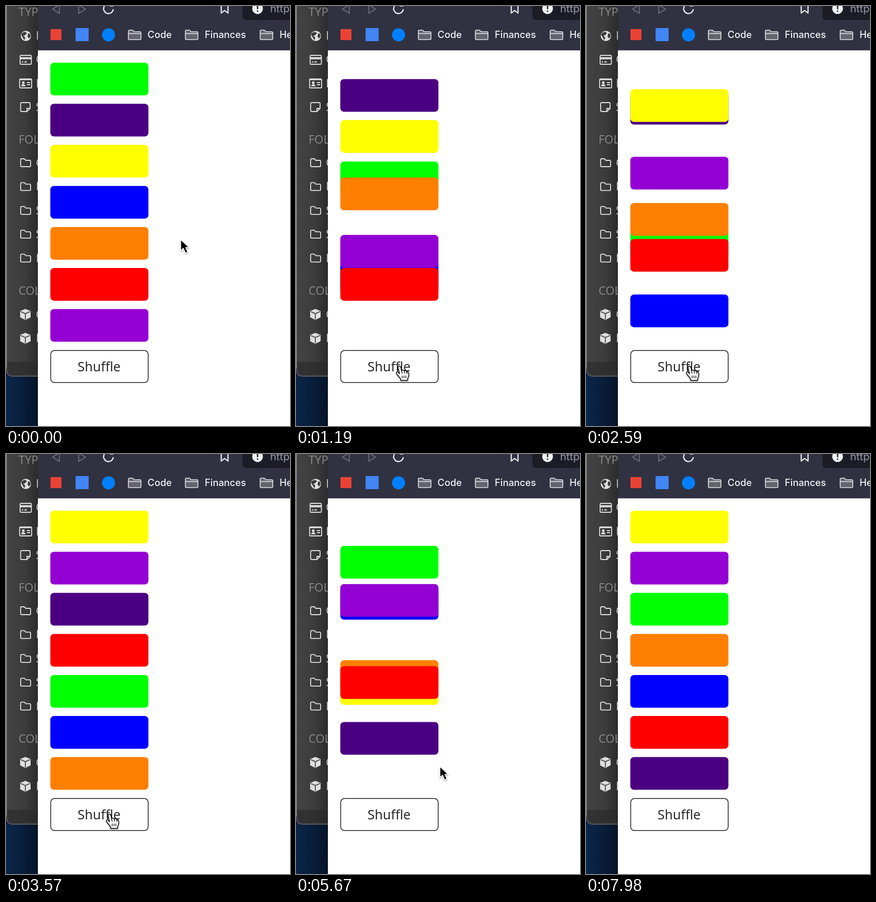
Write an HTML page that moves like this. It is 543 px wide and 800 px high and loops after 8000 ms.

```html
<!DOCTYPE html>
<html lang="en">
<head>
<meta charset="utf-8">
<title>Shuffle</title>
<style>
html, body { margin: 0; width: 100%; height: 100%; overflow: hidden; background: #fff; }
svg { display: block; width: 543px; height: 800px; }
.side { font: 22px "Open Sans", sans-serif; fill: #8a8a8a; }
.item { font: 22px "Open Sans", sans-serif; fill: #c4c4c4; }
.mark { font: 500 18.3px Inter, sans-serif; fill: #f2f2f5; }
.button { font: 25px "Noto Sans", sans-serif; fill: #2b2b2b; }
.line { fill: none; stroke: #dedede; stroke-width: 1.8; stroke-linejoin: round; }
</style>
</head>
<body>
<svg viewBox="0 0 543 800">
  <defs>
    <linearGradient id="panel">
      <stop offset="0" stop-color="#444"/>
      <stop offset=".6" stop-color="#3b3b3b"/>
      <stop offset="1" stop-color="#2b2b2b"/>
    </linearGradient>
    <linearGradient id="desk">
      <stop offset="0" stop-color="#0b274b"/>
      <stop offset="1" stop-color="#061429"/>
    </linearGradient>
    <filter id="shadow" x="-50%" y="-50%" width="200%" height="200%">
      <feDropShadow dx="0" dy="1.5" stdDeviation="1.3" flood-opacity=".4"/>
    </filter>
    <path id="folder" class="line" d="M28 293q0-2 2-2h5l3 3h7q2 0 2 2v8q0 2-2 2H30q-2 0-2-2z"/>
    <g id="cube">
      <path d="M37 577l10 4v12l-10 5-10-5v-12z" fill="#dedede"/>
      <path d="M28 582l9 4 9-4M37 586v11" fill="none" stroke="#3b3b3b" stroke-width="1.6"/>
    </g>
    <g id="markFolder" stroke="#e4e4e8" stroke-width="1.6" stroke-linejoin="round">
      <path d="M1 17V3q0-2 2-2h6l3 3h11q2 0 2 2v11q0 2-2 2H3q-2 0-2-2z" fill="#62646f"/>
      <path d="M1 7.5h24" fill="none"/>
    </g>
  </defs>

  <rect y="690" width="62" height="110" fill="url(#desk)"/>
  <path d="M0 0h62v706H14Q1 706 1 692V0z" fill="url(#panel)"/>
  <path d="M2 678h60v27H14Q2 705 2 692z" fill="#282828" opacity=".6"/>
  <path d="M1 0v692q0 13 13 13h48" fill="none" stroke="#696969" stroke-width="1.3"/>

  <text class="side" x="24" y="19">TYPES</text>
  <text class="side" x="24" y="262">FOLDERS</text>
  <text class="side" x="24" y="550">COLLECTIONS</text>
  <g id="items"></g>

  <circle cx="38" cy="57" r="9.8" fill="#dedede"/>
  <path d="M31 51l6-2 3 3-4 4-3 1 4 3-2 5-3-5-3-5zM42 52l4 1 1 5-3 4-3-4 1-3z" fill="#3b3b3b"/>
  <rect class="line" x="27" y="94" width="21.5" height="17" rx="2"/>
  <path d="M27 99.5h21" stroke="#dedede" stroke-width="4"/>
  <path d="M30 106.5h3m2 0h5" stroke="#dedede" stroke-width="1.8"/>
  <rect class="line" x="26" y="139" width="23" height="17" rx="2"/>
  <path d="M26 140h23" stroke="#dedede" stroke-width="2.5"/>
  <circle cx="33" cy="146" r="2.6" fill="#dedede"/>
  <path d="M29 153q0-4 4-4t4 4zM40 145h6v2h-6zm0 4h6v2h-6z" fill="#dedede"/>
  <path class="line" d="M30 184h14q2 0 2 2v9l-6 6H30q-2 0-2-2v-13q0-2 2-2zM46 195h-6v6"/>

  <rect x="61" width="482" height="800" fill="#fff"/>
  <rect x="61" width="482" height="84.5" fill="#303241"/>
  <path d="M102-2v16L89 6zM139-2v16l13-8z" fill="none" stroke="#70727e" stroke-width="1.7" stroke-linejoin="round"/>
  <path d="M202-2a9.3 9.3 0 1 0 3.2 8" fill="none" stroke="#f2f2f5" stroke-width="2.2"/>
  <path d="M198 1h7v-7z" fill="#f2f2f5"/>
  <path d="M411.500-3v16.500l6.500-5 6.500 5V-3" fill="none" stroke="#f2f2f5" stroke-width="2.2" stroke-linejoin="round"/>
  <path d="M452 0h91v26.500h-84q-7 0-7-7z" fill="#1b1c26"/>
  <circle cx="481" cy="5" r="10.300" fill="#f2f2f5"/>
  <path d="M481-2v8m0 2.500v2.500" stroke="#1b1c26" stroke-width="2.500"/>
  <text class="mark" x="505" y="12" style="font-size:20px;font-weight:400;fill:#999ba5">http</text>

  <rect x="85" y="44" width="21" height="21" fill="#ea4335"/>
  <rect x="133" y="42" width="25" height="25" fill="#4285f4"/>
  <circle cx="196" cy="55" r="12.500" fill="#0080ff"/>
  <use href="#markFolder" x="233" y="45"/>
  <use href="#markFolder" x="342" y="45"/>
  <use href="#markFolder" x="485" y="45"/>
  <text class="mark" x="270.500" y="61">Code</text>
  <text class="mark" x="380" y="61">Finances</text>
  <text class="mark" x="523" y="61">Health</text>

  <rect x="85.500" y="656.300" width="186.300" height="61" rx="7" fill="#fff" stroke="#222" stroke-width="1.500"/>
  <text class="button" x="178" y="696" text-anchor="middle">Shuffle</text>
  <g id="cards"></g>

  <g id="cursor" filter="url(#shadow)" stroke-linejoin="round">
    <path id="arrow" d="M0 0v21l5-4.500 4 9 4.500-2-4-8.500h6.500z" fill="#000" stroke="#fff" stroke-width="1.500"/>
    <g id="hand" stroke="#111" stroke-width="1.500">
      <path d="M-3 2q0-3 2.500-3T2.500 1.500L4 8q.5-2 2.500-1.500T9 8.500q1-1.500 3-.5t2 2.500q3-1.500 3.500 2v5l-2 5V26H2v-3l-6.500-8q-2.500-3-1-4.500t4 1.500l1.500 1.500z" fill="#fff"/>
      <path d="M4 8l1 5M9 9l.5 4M14 11v3M5 17v5m3.500-5v5m3.500-5v5" fill="none" stroke-width="1.300"/>
    </g>
  </g>
</svg>
<script>
const LOOP = 8000, SLIDE = 600;
const $ = id => document.getElementById(id);
const colors = { G: "#0f0", I: "#4b0082", Y: "#ff0", B: "#00f", O: "#ff7f00", R: "#f00", V: "#9400d3" };

// Each order takes effect when the button is pressed at the given time.
const orders = [
  [-SLIDE, "GIYBORV"], [850, "IYOVGRB"], [2350, "YVIRGBO"], [5250, "GBVORYI"], [6850, "YVGOBRI"]
];

// Pointer stops: time, x, y.
const stops = [
  [0, 334, 445], [100, 334, 445], [320, 324, 578], [520, 285, 680], [700, 198, 687],
  [3750, 198, 687], [4150, 335, 618], [4500, 335, 618], [4900, 241, 671],
  [5450, 241, 671], [5850, 300, 540], [6350, 300, 540], [6650, 268, 649],
  [6800, 235, 680], [7050, 235, 680], [7200, 300, 682], [7350, 450, 636], [7500, 560, 610]
];

const ease = p => p * p * (3 - 2 * p);
const mix = (a, b, p) => a + (b - a) * p;
const clamp = p => Math.max(0, Math.min(1, p));
const slotY = i => 108 + 78.22 * i;

$("items").innerHTML =
  [..."LCLS"].map((c, i) => `<text class="item" x="57" y="${64 + 45.3 * i}">${c}</text>`).join("") +
  [..."CLSSL"].map((c, i) => `<use href="#folder" y="${45.4 * i}"/><text class="item" x="57" y="${306 + 45.4 * i}">${c}</text>`).join("") +
  [..."CL"].map((c, i) => `<use href="#cube" y="${45.4 * i}"/><text class="item" x="57" y="${595 + 45.4 * i}">${c}</text>`).join("");

$("cards").innerHTML = Object.entries(colors).map(([key, fill]) =>
  `<rect id="card${key}" x="84.700" width="187.600" height="62.300" rx="7" fill="${fill}"/>`).join("");

function drawCards(t) {
  const k = orders.findLastIndex(([start]) => start <= t);
  const [start, now] = orders[k];
  const before = orders[Math.max(0, k - 1)][1];
  const p = ease(clamp((t - start) / SLIDE));
  for (const key in colors)
    $("card" + key).setAttribute("y", mix(slotY(before.indexOf(key)), slotY(now.indexOf(key)), p));
}

function drawCursor(t) {
  const k = stops.findLastIndex(([time]) => time <= t);
  const a = stops[k], b = stops[k + 1] || a;
  const p = ease(clamp((t - a[0]) / (b[0] - a[0] || 1)));
  const x = mix(a[1], b[1], p), y = mix(a[2], b[2], p);
  const over = x > 85 && x < 272 && y > 656 && y < 718;
  $("cursor").setAttribute("transform", `translate(${x} ${y})`);
  $("arrow").style.display = over ? "none" : "";
  $("hand").style.display = over ? "" : "none";
}

function frame(now) {
  const t = now % LOOP;
  drawCards(t);
  drawCursor(t);
  requestAnimationFrame(frame);
}
frame(0);
</script>
</body>
</html>
```
